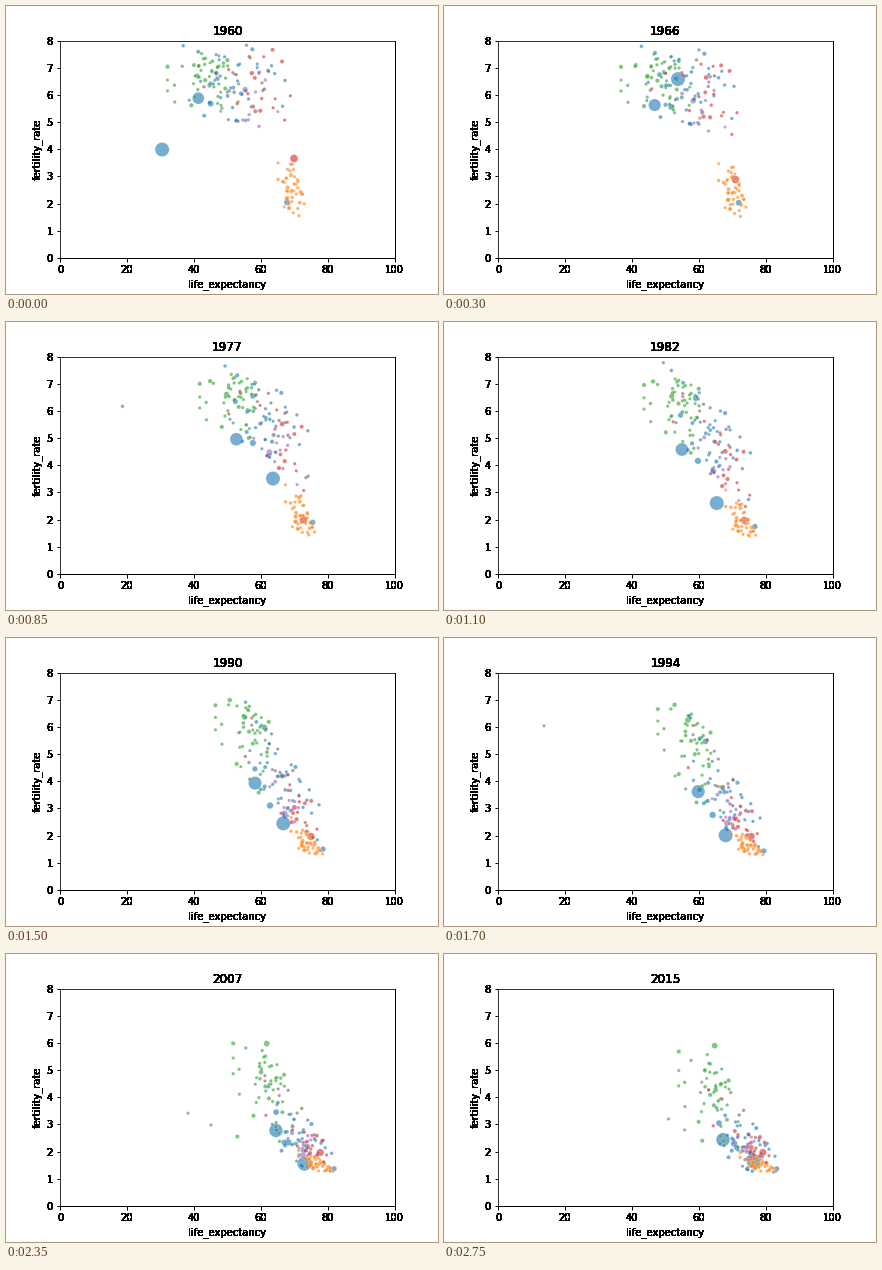
Recreate the animation shown at these times as a matplotlib script. Size 432 px wide and 288 px high, loop 2800 ms.

```python
import numpy as np
import matplotlib
import matplotlib.pyplot as plt
from matplotlib.animation import FuncAnimation

matplotlib.rcParams["font.family"] = "DejaVu Sans"
rng = np.random.default_rng(12)

YEARS = np.arange(1960, 2016)
PROGRESS = (YEARS - 1960) / 55

COLORS = {
    "asia": "tab:blue",
    "europe": "tab:orange",
    "africa": "tab:green",
    "north": "tab:red",
    "south": "tab:purple",
    "oceania": "tab:brown",
}

life, fert, people, colors = [], [], [], []


def add(region, pop, lives, ferts):
    life.append(lives)
    fert.append(ferts)
    people.append(pop[0] + (pop[1] - pop[0]) * PROGRESS)
    colors.append(COLORS[region])


def transition(mid, width):
    """S-curve from 0 to 1 over the whole period, steepest at mid."""
    s = 1 / (1 + np.exp((mid - YEARS) / width))
    return (s - s[0]) / (s[-1] - s[0])


def country(region, pop, lives, ferts, mid, width=7, power=0.7, dip=None):
    """Life expectancy grows as a power of time, fertility falls in an S.

    dip is (year, depth, width) of a temporary loss of life expectancy.
    """
    x = lives[0] + (lives[1] - lives[0]) * PROGRESS ** power
    y = ferts[0] + (ferts[1] - ferts[0]) * transition(mid, width)
    if dip:
        year, depth, spread = dip
        x = x - depth * np.exp(-((YEARS - year) / spread) ** 2)
    add(region, pop, x, y)


def crowd(region, count, lives, ferts, life_sd, fert_sd, mid, power=0.7):
    """Small countries around a regional path; healthier ones go first."""
    for _ in range(count):
        u, v, w = np.clip(rng.normal(size=3), -1.9, 1.9)
        x = np.array(lives) + np.array(life_sd) * u
        y = np.array(ferts) + np.array(fert_sd) * (0.8 * v - 0.6 * u)
        y[0] = ferts[0] + fert_sd[0] * (0.95 * v - 0.2 * u)
        y[1] = 1.25 + abs(y[1] - 1.25)
        pop = min(rng.lognormal(1.6, 1.0), 30)
        country(region, (pop, 2 * pop), x, y, mid - 5 * u + 3 * w,
                power=power)


# China: famine, rebound, then a steep fall
knots = [1960, 1961, 1963, 1972, 1980, 1990, 1999, 2015]
add("asia", (660, 1397),
    np.interp(YEARS, knots, [30.5, 34, 50, 61.3, 65, 66.7, 69.6, 76.4]),
    np.interp(YEARS, knots, [3.99, 3.3, 7.4, 4.95, 2.65, 2.45, 1.47, 1.64]))

# India, Indonesia, Japan, Pakistan, Bangladesh
country("asia", (450, 1309), (41.3, 67.2), (5.88, 2.44), 1987, 14)
country("asia", (88, 258), (45, 70.5), (5.68, 2.3), 1983, 6, 0.6)
country("asia", (93, 128), (67.8, 83.3), (2.05, 1.37), 1983, 5, 0.6)
country("asia", (45, 189), (47, 66), (6.6, 3.05), 1998, 5, 0.5)
country("asia", (48, 161), (46.7, 71.3), (6.8, 2.15), 1990, 6, 1.25)

# United States, Mexico, Brazil, Nigeria
country("north", (183, 320), (69.9, 79.1), (3.66, 1.97), 1966, 2.5, 1)
country("north", (38, 126), (57.3, 75.6), (6.8, 2.15), 1982, 5.5, 0.6)
country("south", (72, 206), (55.3, 75), (6.2, 1.75), 1979, 9, 0.85)
country("africa", (45, 181), (41, 64.7), (6.7, 5.9), 1993, 8, 0.85)

# Epidemic in southern Africa
for k, depth in enumerate((11, 16, 20)):
    country("africa", (17 / (1 + 4 * k), 55 / (1 + 4 * k)),
            (52 - 2 * k, 66 - 3 * k), (6.1, 2.4 + 0.4 * k), 1983 + 3 * k, 9,
            1, dip=(2007, depth, 9))

# War, famine and earthquake years
country("africa", (22, 100), (40, 65), (7.1, 4.27), 2003, 4, 1.4,
        dip=(1984, 10, 1.2))
country("africa", (3, 11), (43, 66), (8.3, 3.9), 1994, 6, 1.4,
        dip=(1994, 41, 0.6))
country("asia", (6, 15), (42, 68.5), (6.5, 2.6), 1991, 6, 1,
        dip=(1977.3, 32, 2.5))
country("north", (4, 11), (43, 64.3), (6.3, 2.95), 1994, 9, 0.9,
        dip=(2010, 30, 0.5))

crowd("africa", 45, (43.5, 63.5), (6.7, 4.3), (6, 5), (0.65, 1.1), 1995)
crowd("asia", 40, (52, 74), (6.5, 2.3), (8, 4.6), (0.8, 0.6), 1988)
crowd("europe", 41, (69.3, 78), (2.55, 1.55), (2.2, 3), (0.5, 0.17), 1979, 1)
crowd("north", 16, (58, 75.5), (6.2, 2.2), (6, 3), (0.9, 0.35), 1981)
crowd("south", 11, (57, 74.5), (6, 2.3), (5.5, 2.5), (0.8, 0.35), 1983)
crowd("oceania", 8, (58, 70.5), (6.2, 3.3), (6, 4), (0.9, 0.7), 1986)

life, fert, people = map(np.array, (life, fert, people))
areas = 10 + 190 * people / people.max(axis=0)


def ink(text, passes=30):
    """Paint a label many times so its soft edges turn solid."""
    draw = text.draw

    def repeat(renderer):
        for _ in range(passes):
            draw(renderer)

    text.draw = repeat


fig = plt.figure(figsize=(6, 4), dpi=72, facecolor="white")
ax = fig.add_axes([0.125, 0.125, 0.775, 0.755])
ax.set_xlim(0, 100)
ax.set_ylim(0, 8)
ax.set_xticks(range(0, 101, 20))
ax.set_yticks(range(9))
ax.tick_params(width=1)
ax.spines[["bottom", "right"]].set_linewidth(1)
ax.spines[["top", "left"]].set_linewidth(0.8)
ax.set_xlabel("life_expectancy")
ax.set_ylabel("fertility_rate")
title = ax.set_title("1960")
for label in [title, ax.xaxis.label, ax.yaxis.label,
              *ax.get_xticklabels(), *ax.get_yticklabels()]:
    ink(label)

dots = ax.scatter(life[:, 0], fert[:, 0], s=areas[:, 0], c=colors,
                  alpha=0.6, edgecolors="white", linewidths=0.25)


def update(i):
    dots.set_offsets(np.column_stack([life[:, i], fert[:, i]]))
    dots.set_sizes(areas[:, i])
    title.set_text(str(YEARS[i]))
    return dots, title


anim = FuncAnimation(fig, update, frames=len(YEARS), interval=50,
                     repeat=True, repeat_delay=0, blit=False)
plt.show()
```
